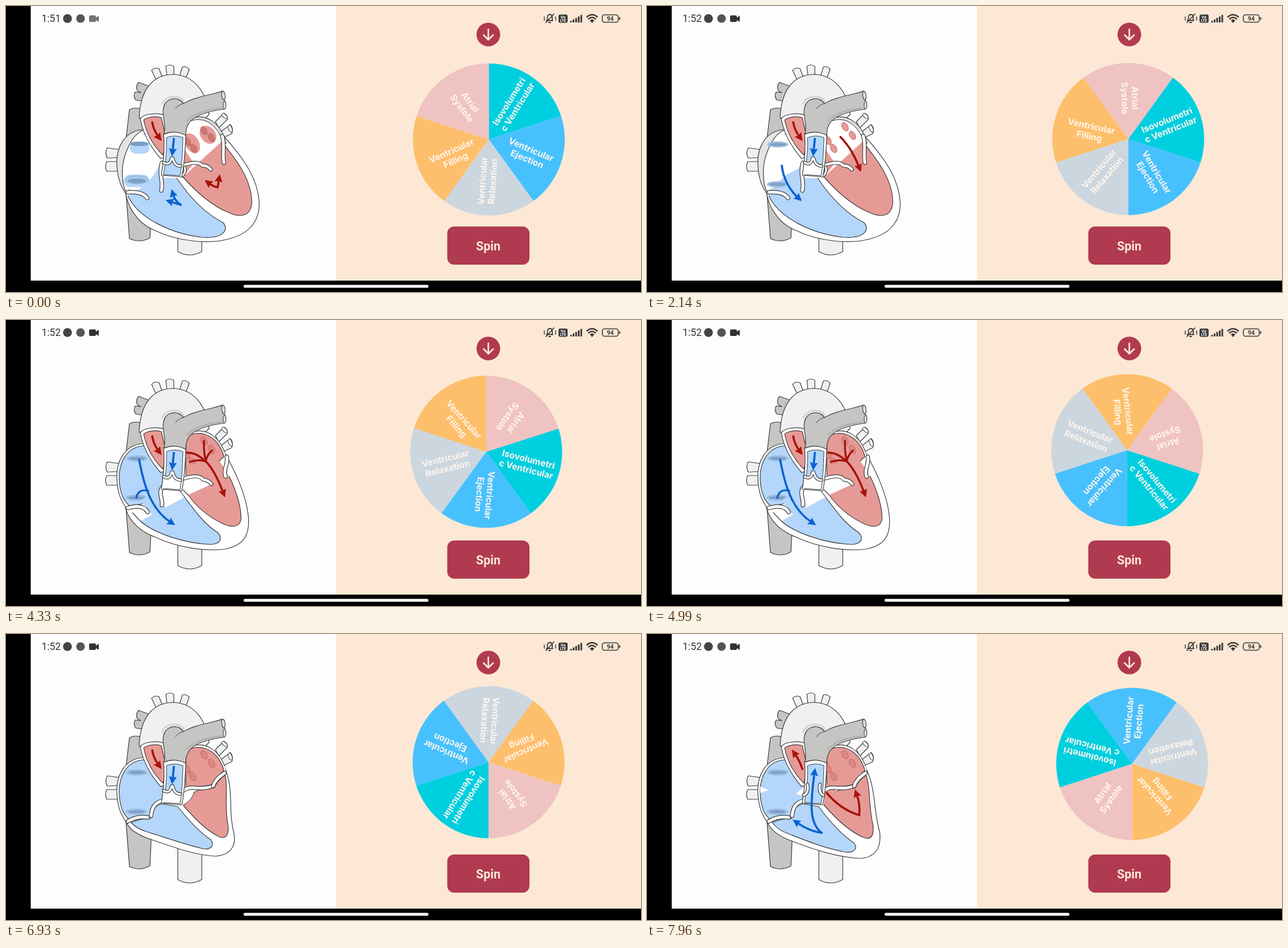
Recreate the animation shown at these times as an HTML page. Size 1116 by 502 pixels, loop 8000 ms.

```html
<!DOCTYPE html>
<html lang="en">
<head>
<meta charset="utf-8">
<title>Cardiac cycle wheel</title>
<style>
html, body { margin: 0; width: 100%; height: 100%; overflow: hidden; background: #000; }
svg { display: block; width: 100vw; height: 100vh; }
.ui { font-family: Roboto, sans-serif; }
.label { font: 700 15.6px Inter, sans-serif; fill: #fff5ec; text-anchor: middle; }
</style>
</head>
<body>
<svg id="stage" viewBox="0 0 1116 502"></svg>
<script>
const LOOP = 8000;
const INK = '#3a3a3a', RED = '#e69a96', BLUE = '#b3d6fa', GREY = '#c5c5c3', PALE = '#f0f0f2';
const DARK_RED = '#a81208', DARK_BLUE = '#0a62cf', WINE = '#b03a4f', CREAM = '#fce8d5';

const shape = (d, fill, line = INK, w = 1.2) =>
  `<path d="${d}" fill="${fill}" stroke="${line}" stroke-width="${w}" stroke-linejoin="round"/>`;
const patch = (d, fill) => shape(d, fill, 'none', 0);
const line = (d, color, w) =>
  `<path d="${d}" fill="none" stroke="${color}" stroke-width="${w}" stroke-linecap="round" stroke-linejoin="round"/>`;
const flap = (d, w = 5) => line(d, INK, w + 2.4) + line(d, '#fff', w);
const oval = (x, y, rx, ry, fill, stroke = 'none', turn = 0) =>
  `<ellipse cx="${x}" cy="${y}" rx="${rx}" ry="${ry}" fill="${fill}" stroke="${stroke}" transform="rotate(${turn} ${x} ${y})"/>`;
const box = (x, y, w, h, r, fill, more = '') =>
  `<rect x="${x}" y="${y}" width="${w}" height="${h}" rx="${r}" fill="${fill}" ${more}/>`;
const arrow = (d, color) =>
  `<path d="${d}" fill="none" stroke="${color}" stroke-width="3.7" stroke-linecap="round" marker-end="url(#${color === DARK_RED ? 'red' : 'blue'})"/>`;
const marker = (id, color) =>
  `<marker id="${id}" markerUnits="userSpaceOnUse" markerWidth="15" markerHeight="14" refX="3" refY="7" orient="auto"><path d="M0,0L14,7L0,14L2,7Z" fill="${color}"/></marker>`;

// Vessels behind the heart
const vessels = [
  ['M217,182 L211,232 L250,232 L240,182 Q228,176 217,182Z', GREY],
  ['M210,318 L217,408 Q235,417 253,407 L256,340Z', GREY],
  ['M302,360 V431 Q323,443 344,431 V360Z', PALE],
  ['M252,141 L233,134 Q227,141 231,149 L237,152 L227,151 Q223,158 228,165 L246,168Z', GREY],
  ['M200,252 L178,249 Q173,258 178,267 L198,266Z', PALE],
  ['M198,273 L177,273 Q173,282 177,290 L198,290Z', PALE],
  ['M368,203 L383,188 Q390,192 389,199 L374,214Z', PALE],
  ['M376,222 L394,208 Q400,214 397,224 L382,231Z', PALE],
  ['M264,130 L256,113 Q261,107 269,110 L275,126Z', PALE],
  ['M283,124 L281,106 Q288,101 295,106 L295,124Z', PALE],
  ['M304,126 L310,107 Q317,105 322,111 L315,130Z', PALE],
  ['M234,196 C236,150 255,121 293,120 C330,121 352,150 357,190 L320,230 L270,235Z', PALE]
].map(v => shape(...v)).join('') +
  oval(384, 193, 3, 6, '#fff', INK, -45) + oval(394, 215, 3, 6.5, '#fff', INK, -20);

// Great arteries in front
const arteries =
  shape('M236,198 C240,190 265,186 280,192 L284,262 L272,268 C252,245 240,222 236,198Z', '#fff') +
  shape('M242,200 C250,194 265,193 273,196 L282,235 L276,262 C258,245 246,222 242,200Z', RED) +
  shape('M277,224 Q296,217 316,226 C315,255 313,280 309,300 L273,297 C277,270 279,250 277,224Z', '#fff') +
  shape('M282,231 Q297,225 311,231 C310,260 309,280 306,298 L277,296 C281,270 283,250 282,231Z', BLUE, INK, 1) +
  shape('M278,225 C282,205 273,192 277,178 C281,160 303,158 312,171 C335,158 360,157 381,149 Q386,156 383,165 L385,167 Q388,175 384,181 C360,184 332,190 321,206 C316,215 316,220 316,227 Q296,217 278,225Z', GREY) +
  line('M318,202 C332,186 356,182 378,179', '#aaa9a7', 2) +
  line('M312,171 Q302,174 298,180', INK, 1) +
  line('M274,172 C282,156 302,155 312,166', '#d3d3d3', 3) +
  oval(382, 157, 3, 7.5, '#dadad8', INK, -8) + oval(384, 174, 2.5, 7, '#dadad8', INK);

const body = (d, fullAtria) =>
  shape(d, '#fff') +
  shape('M324,198 C350,187 378,204 387,242', fullAtria ? '#fff' : '#e1e1e1') +
  shape('M240,217 C207,220 193,250 195,280 C196,305 203,318 211,330', fullAtria ? '#fff' : '#e4e4e4') +
  patch('M240,218 L320,200 L385,233 L389,262 L320,300 L213,331Z', '#fff');

const bigBody = body('M209,310 C208,350 232,383 262,394 C300,413 360,420 398,407 C430,397 446,375 445,345 C443,305 420,270 384,230');
const bigRight = patch('M271,274 Q258,312 214,333 C232,372 290,400 345,406 L300,302 H273Z', BLUE) +
  shape('M214,333 C232,372 290,400 345,406 C385,409 392,390 381,380 C350,364 322,335 300,302', BLUE);
const emptyAtria =
  patch('M318,206 C340,192 370,206 381,240 L366,262 L317,272Z', '#fff') +
  line('M324,202 C350,192 372,210 381,238', INK, 1) +
  shape('M243,221 C222,228 206,270 208,296 Q208,315 215,327', '#fff', INK, 8) +
  shape('M243,221 C222,228 206,270 208,296 Q208,315 215,327', '#fff', '#fff', 5.6);
const bigLeft = patch('M313,250 L330,276 L311,300Z', RED) +
  patch('M311,300 C330,290 345,276 358,258 L379,238 L432,345 L390,362Z', RED) +
  shape('M379,238 C405,270 432,305 432,345 C430,372 408,371 390,362 C360,350 330,322 311,300', RED);
const bigFlaps = flap('M214,327 Q240,325 248,337') + flap('M274,275 C268,295 277,308 273,324') +
  flap('M380,228 C385,243 380,260 383,275') + flap('M313,279 Q338,271 345,280 Q355,280 360,287', 4.5) +
  flap('M314,283 Q317,291 310,298', 3);

const veins = (list, fill) => list.map(([x, y]) => oval(x, y, 5, 8, fill, '#c26b66', -30)).join('');
const VEINS = [[348, 212], [361, 227], [318, 236], [328, 250]];
const caval = (x, y) => oval(x, y, 18, 4.6, '#a8c9ea', '#8aa9c9') + oval(x, y, 15, 2.8, '#7b9fc6');
const fullAtria =
  shape('M240,221 C212,224 198,250 199,280 C200,305 207,318 218,327 L252,320 Q256,300 275,292 L277,255 L258,226 Q250,220 240,221Z', BLUE) +
  caval(230, 243) + caval(229, 312) +
  shape('M316,206 C342,188 375,206 383,240 Q372,248 366,264 L316,272Z', RED) +
  veins(VEINS, '#dc8782');
const shutFlaps = flap('M214,329 Q230,319 249,322') + flap('M255,319 C256,304 262,296 276,292') +
  flap('M313,274 C325,264 338,276 364,267') + flap('M364,267 C368,255 376,250 384,244');

const shutValve = flap('M277,275 Q288,281 291,267 L293,267 Q296,281 307,281', 3.5);
const drained = patch('M277,277 L291,268 L308,281 L305,297 L275,295Z', '#fff');
const outflow = arrow('M257,204 Q259,217 267,228', DARK_RED) + arrow('M295,233 L293,253', DARK_BLUE);

// Each phase: chambers behind the arteries, then valves and arrows above
const phases = [
  {
    mid: bigBody + emptyAtria + bigRight +
      box(218, 238, 34, 21, 9, BLUE) + oval(234, 242, 17, 4, '#7b9fc6') +
      box(207, 296, 45, 22, 11, BLUE) + oval(230, 305, 20, 7, '#a8c9ea', '#8aa9c9') + oval(230, 307, 16, 4, '#7b9fc6') +
      oval(355, 226, 13, 17, RED, 'none', -38) + oval(327, 241, 12, 19, RED, 'none', -30) +
      veins([[348, 219], [361, 231], [319, 238], [330, 250]], '#cf7772') +
      bigLeft + bigFlaps,
    top: shutValve + outflow +
      arrow('M372,318 L374,306', DARK_RED) + arrow('M372,318 Q366,318 358,312', DARK_RED) +
      arrow('M307,349 Q297,342 294,332', DARK_BLUE) + arrow('M307,349 L291,344', DARK_BLUE)
  },
  {
    mid: bigBody + emptyAtria + caval(230, 243) +
      patch('M213,326 L245,296 L273,282 V304 L214,333Z', BLUE) + veins(VEINS, RED) + bigRight + caval(229, 313) + bigLeft + bigFlaps,
    top: drained + shutValve + outflow +
      arrow('M340,230 Q360,250 372,281', DARK_RED) + arrow('M237,280 C239,302 251,323 264,335', DARK_BLUE)
  },
  {
    mid: body('M208,315 C209,347 232,370 262,381 C300,399 350,407 385,402 C416,396 429,380 426,345 C422,305 402,265 384,232', true) +
      fullAtria +
      patch('M236,318 L275,290 V303 L281,337 L262,348 L247,330Z', BLUE) +
      patch('M262,347 L236,353 L360,394 L314,311 L279,338Z', BLUE) +
      shape('M236,353 C260,374 312,392 360,394 C379,393 380,382 372,373 C348,358 332,335 314,311', BLUE) +
      line('M222,338 L236,353 M314,311 L306,300', INK, 1.2) +
      patch('M318,255 L372,245 L386,262 L392,280 L363,291 L345,278 L318,272Z', RED) +
      patch('M320,307 Q345,304 363,289 L392,274 L395,300 L380,357Z', RED) +
      shape('M392,274 C405,300 414,330 413,350 C410,366 395,364 380,357 C355,345 335,328 320,307', RED) +
      line('M320,307 L311,298', INK, 1.2) +
      flap('M214,330 Q240,322 249,337') + flap('M276,292 C266,304 276,313 274,325') +
      flap('M388,240 C391,253 381,262 386,275') + flap('M313,278 Q340,270 346,280 Q356,281 361,288', 4.5),
    top: drained + shutValve + outflow +
      line('M318,233 Q335,232 350,248 M348,212 Q347,230 351,248 M362,229 Q354,236 351,247 M323,249 Q338,244 351,248', DARK_RED, 3.4) +
      arrow('M351,248 C363,260 373,280 381,301', DARK_RED) +
      line('M229,312 Q233,295 250,300', DARK_BLUE, 3.4) + arrow('M234,245 C242,290 255,332 288,354', DARK_BLUE)
  },
  {
    mid: body('M208,315 C209,340 228,352 256,361 C295,374 330,388 368,390 C395,388 404,372 401,352 C389,305 402,275 384,234', true) +
      fullAtria +
      shape('M220,331 Q238,323 254,324 Q257,302 274,298 L302,303 C318,324 341,349 360,361 C367,371 360,379 347,377 C315,370 280,357 247,347 Q230,342 220,331Z', BLUE) +
      shape('M311,300 Q324,280 338,274 L366,270 Q372,256 385,248 C391,268 383,300 390,335 C393,354 385,360 375,356 C350,344 330,322 311,300Z', RED) +
      patch('M309,302 V274 L331,277 Q327,292 312,300Z', '#fff') + line('M312,300 Q327,292 331,277', INK, 1) + shutFlaps,
    top: drained + shutValve + outflow
  },
  {
    mid: body('M208,315 C209,340 228,354 256,364 C295,379 335,392 375,394 C402,392 412,374 409,348 C397,305 403,272 384,234', true) +
      fullAtria + patch('M199,268 L214,274 L199,279Z M276,268 L262,280 L276,286Z', '#fff') +
      shape('M220,331 Q238,323 254,324 Q257,302 274,298 L302,303 C318,326 343,353 364,367 C371,377 364,384 350,383 C315,377 280,363 247,350 Q230,344 220,331Z', BLUE) +
      shape('M311,300 Q324,280 338,274 L366,270 Q372,256 385,248 C393,268 389,300 397,335 C400,356 392,362 380,357 C353,345 330,322 311,300Z', RED) +
      patch('M313,262 L334,276 L311,300Z', RED) + shutFlaps,
    top: flap('M275,283 Q285,279 282,264', 3.5) + flap('M310,283 Q301,279 304,264', 3.5) +
      arrow('M273,237 Q268,222 261,212', DARK_RED) +
      line('M316,279 Q340,308 373,318', DARK_RED, 3.7) + arrow('M373,318 Q375,300 369,283', DARK_RED) +
      arrow('M307,349 C285,332 287,300 294,246', DARK_BLUE) + arrow('M307,349 Q285,346 265,332', DARK_BLUE)
  }
];

// Wheel: colour, label lines, label offset from hub, text angle
const HUB = { x: 848.5, y: 234.3, r: 133.5 };
const sectors = [
  ['#00cfe0', 'Isovolumetri', 'c Ventricular', 43, -62, -58],
  ['#47c1fd', 'Ventricular', 'Ejection', 71, 26, 23],
  ['#ccd6df', 'Ventricular', 'Relaxation', -2, 73, -86],
  ['#fdbf6b', 'Ventricular', 'Filling', -62, 28, -24],
  ['#efc3c2', 'Atrial', 'Systole', -40, -60, 53]
];
const rim = deg => {
  const a = deg * Math.PI / 180;
  return `${HUB.x + HUB.r * Math.sin(a)},${HUB.y - HUB.r * Math.cos(a)}`;
};
const wheel = sectors.map(([color, a, b, x, y, turn], i) =>
  patch(`M${HUB.x},${HUB.y} L${rim(i * 72)} A${HUB.r},${HUB.r} 0 0 1 ${rim(i * 72 + 72)}Z`, color) +
  `<g class="label" transform="translate(${HUB.x + x} ${HUB.y + y}) rotate(${turn})">
    <text y="-3.5">${a}</text><text y="14.5">${b}</text></g>`).join('');

const bars = [0, 1, 2, 3, 4].map(i => box(991.5 + i * 4.5, 26 - i * 2.6, 3, 3 + i * 2.6, 1, INK)).join('');
const status =
  `<text id="clock" class="ui" x="62.5" y="28" font-size="17.5" fill="#333"></text>` +
  oval(108, 22, 7.8, 7.8, '#444') + oval(131, 22, 7.6, 7.6, '#555') +
  `<g id="camera">${box(146, 16.5, 12, 11.5, 2, 'currentColor')}${patch('M157,21 L163,17 V28 L157,24Z', 'currentColor')}</g>` +
  line('M949.5,25.5 H961 M951.5,25 V20 Q952,15 956,15 Q960,15 960,20 V25 M954,29 H957 M949,29 L963,14', INK, 1.8) +
  line('M946,19 V25 M966,19 V25', INK, 1.5) +
  box(971, 15, 16, 14.5, 3, INK) +
  `<g class="ui" font-weight="700" text-anchor="middle"><text x="979" y="21.5" font-size="7" fill="#fff">Vo</text>
   <text x="979" y="28" font-size="6.5" fill="#fff">LTE</text><text x="1062" y="26" font-size="10.5" fill="${INK}">94</text></g>` +
  bars + line('M1021,19 Q1030,11.5 1039,19 M1024,22.5 Q1030,17.5 1036,22.5', INK, 2.4) +
  patch('M1026,25 Q1030,22 1034,25 L1030,30Z', INK) +
  box(1048, 15.5, 28, 13, 4, 'none', `stroke="${INK}" stroke-width="1.6"`) + box(1077.5, 19.5, 2, 5, 1, INK);

const group = (id, s) => `<g id="${id}">${s}</g>`;
const stage = document.getElementById('stage');
stage.innerHTML =
  `<defs>${marker('red', DARK_RED)}${marker('blue', DARK_BLUE)}</defs>` +
  box(0, 0, 1116, 502, 0, '#000') + box(43.5, 0, 537, 482, 0, '#fdfcff') + box(580, 0, 536, 482, 0, CREAM) +
  box(417.5, 489.5, 325, 5, 2.5, '#fff') + vessels +
  phases.map((p, i) => group('mid' + i, p.mid)).join('') + arteries +
  phases.map((p, i) => group('top' + i, p.top)).join('') +
  group('wheel', wheel) +
  oval(847.7, 50, 20.8, 20.8, WINE) + line('M847.7,41 V59 M839.5,51 L847.7,59.3 L856,51', CREAM, 2.8) +
  box(775.5, 387, 144.5, 67, 12, WINE) +
  `<text class="ui" x="847.5" y="428.5" font-size="21.5" font-weight="600" text-anchor="middle" fill="${CREAM}">Spin</text>` +
  status;

const get = id => document.getElementById(id);
const mids = phases.map((_, i) => get('mid' + i)), tops = phases.map((_, i) => get('top' + i));
const wheelNode = get('wheel'), clock = get('clock'), camera = get('camera');

// Spin start, end, degrees turned; the heart switches as a boundary passes the pointer
const spins = [[1460, 2140, 36], [4056, 4990, 72], [5480, 6060, 72], [7030, 7960, 72]];
const switches = [1470, 4325, 5645, 7300];
const clamp = u => Math.max(0, Math.min(1, u));

function draw(t) {
  const angle = spins.reduce((sum, [from, to, turn]) => {
    const rest = 1 - clamp((t - from) / (to - from));
    return sum + turn * (1 - rest * rest);
  }, 0);
  wheelNode.setAttribute('transform', `rotate(${angle} 848.3 229.7)`);
  const phase = switches.filter(s => t >= s).length;
  phases.forEach((_, i) => {
    const show = i === phase ? 'inline' : 'none';
    mids[i].style.display = tops[i].style.display = show;
  });
  clock.textContent = t < 1700 ? '1:51' : '1:52';
  const tone = Math.round(115 - 65 * clamp((t - 40) / 780));
  camera.style.color = `rgb(${tone},${tone},${tone})`;
}

function tick(now) {
  draw(now % LOOP);
  requestAnimationFrame(tick);
}
draw(0);
requestAnimationFrame(tick);
</script>
</body>
</html>
```
